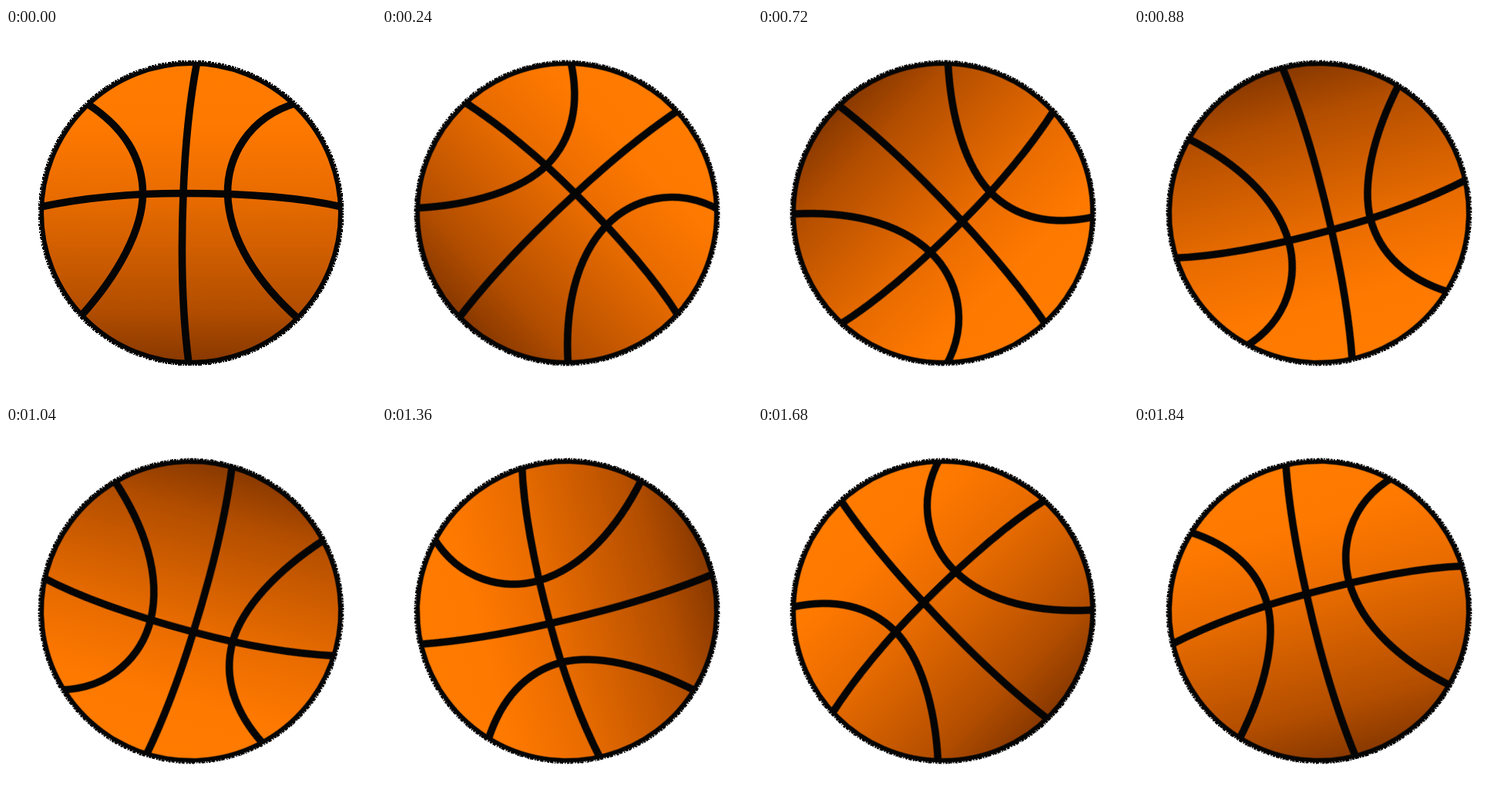
Recreate the animation shown at these times as an HTML page. Size 480 by 480 pixels, loop 1920 ms.

```html
<!DOCTYPE html>
<html lang="en">
<head>
<meta charset="utf-8">
<title>Spinning basketball</title>
<style>
  html, body {
    margin: 0;
    width: 100%;
    height: 100%;
    overflow: hidden;
    background: #fff;
  }
  svg {
    display: block;
    width: 100%;
    height: 100%;
  }
  .ball {
    transform-origin: 240px 240px;
    animation: spin 1920ms steps(24, end) infinite;
  }
  .ball path, .ball circle {
    fill: none;
    stroke: #050505;
  }
  .ball .skin { fill: url(#shade); stroke: none; }
  .seams { stroke-width: 9.6; }
  .rim { stroke-width: 5.6; }
  .ball .fuzz {
    stroke: #000;
    stroke-width: 2;
    stroke-dasharray: 3 1.2 1.6 1.8 4.4 1.1;
    shape-rendering: crispEdges;
  }
  @keyframes spin {
    to { transform: rotate(360deg); }
  }
</style>
</head>
<body>
<svg viewBox="0 0 480 480">
  <defs>
    <linearGradient id="shade" gradientUnits="userSpaceOnUse" x1="0" y1="46" x2="0" y2="434">
      <stop offset="0" stop-color="#ff7b00"/>
      <stop offset=".2" stop-color="#fe7900"/>
      <stop offset=".32" stop-color="#f47200"/>
      <stop offset=".44" stop-color="#e96c00"/>
      <stop offset=".66" stop-color="#cb5b00"/>
      <stop offset=".82" stop-color="#b34e00"/>
      <stop offset="1" stop-color="#883800"/>
    </linearGradient>
    <clipPath id="edge"><circle cx="240" cy="240" r="196"/></clipPath>
  </defs>
  <g class="ball">
    <circle class="skin" cx="240" cy="240" r="194"/>
    <g class="seams" clip-path="url(#edge)">
      <path d="M248 43C238 95 232 160 230 215C227 288 228 368 237.5 438"/>
      <path d="M43 232.5C105 219 170 214.5 230 214.5S375 218 438 232.5"/>
      <path d="M105 98C152 128 177.5 168 177.5 215C177 261 146.5 319 97 374"/>
      <path d="M378 97C312 116 287 170 287.5 215C289 275 328 332 380 378"/>
    </g>
    <circle class="rim" cx="240" cy="240" r="193.8"/>
    <circle class="fuzz" cx="240" cy="240" r="197.2"/>
  </g>
</svg>
</body>
</html>
```
